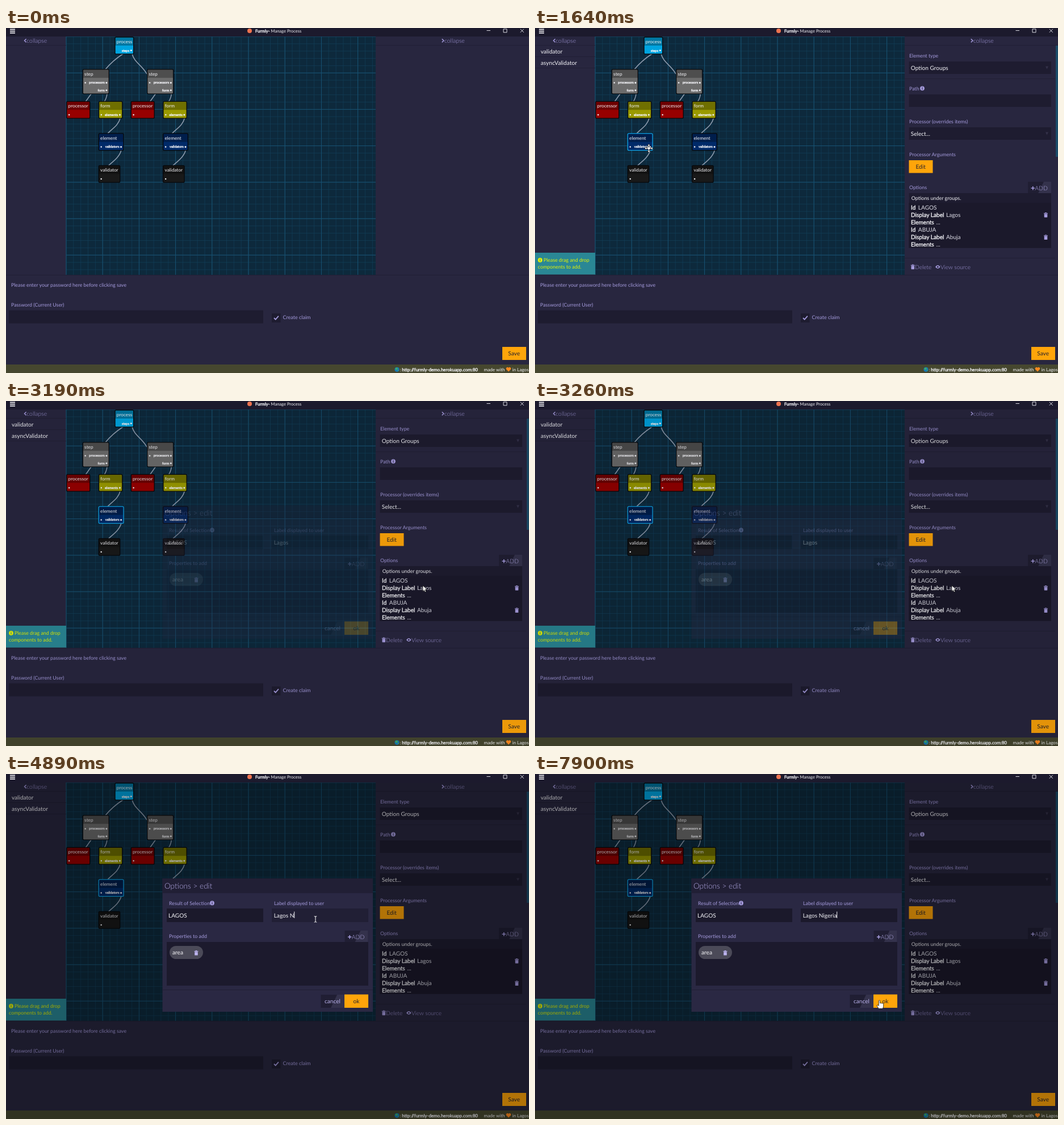
An HTML page for the animation above (8000 ms loop, 921x608 px).

```html
<!DOCTYPE html>
<html lang="en">
<head>
<meta charset="utf-8">
<title>Manage Process</title>
<style>
html, body { margin: 0; width: 100%; height: 100%; overflow: hidden; background: #28263f; }
svg { display: block; }
text { font-family: Lato, "Open Sans", sans-serif; white-space: pre; text-rendering: geometricPrecision; }
.light { font-weight: 300; }
.heavy { stroke: currentColor; stroke-width: .35; }
</style>
</head>
<body>
<svg id="stage" width="921" height="608" viewBox="0 0 921 608"></svg>
<script>
const LILAC = '#a59bdd', WHITE = '#f4f4f8', FIELD = '#1e1c30', ORANGE = '#ffa50a', LINE = '#211f35';
const SMALL = 8.82, MEDIUM = 10.1;

const rect = (x, y, w, h, fill, extra = '') =>
  `<rect x="${x}" y="${y}" width="${w}" height="${h}" fill="${fill}" ${extra}/>`;
const text = (x, y, str, size = SMALL, fill = LILAC, extra = '') =>
  `<text x="${x}" y="${y}" font-size="${size}" fill="${fill}" ${extra}>${str}</text>`;
const path = (d, stroke, width = 1, extra = '') =>
  `<path d="${d}" fill="none" stroke="${stroke}" stroke-width="${width}" ${extra}/>`;
const shape = (d, fill, extra = '') => `<path d="${d}" fill="${fill}" ${extra}/>`;
const dot = (x, y, r, fill) => `<circle cx="${x}" cy="${y}" r="${r}" fill="${fill}"/>`;
const group = (id, body, extra = '') => `<g id="${id}" ${extra}>${body}</g>`;
const light = 'class="light"';
const heavy = `class="heavy" color="${WHITE}"`;

const info = (x, y, fill, mark) => dot(x, y, 3.9, fill) + rect(x - .6, y - 2.4, 1.2, 1.2, mark) + rect(x - .6, y - .5, 1.2, 2.8, mark);
const trash = (x, y, fill = LILAC) =>
  rect(x - 3.5, y - 3.4, 7, 1.2, fill) + rect(x - 1.3, y - 4.4, 2.6, 1.2, fill) +
  rect(x - 2.8, y - 1.8, 5.6, 6, fill, 'rx=".6"');
const button = (x, y, w, h, label, tx) => rect(x, y, w, h, ORANGE) + text(tx, y + h / 2 + 3.7, label, MEDIUM, '#25222c');
const slanted = (x, y, w, h) =>
  rect(x, y, w, h, '#201e33') + shape(`M${x + w} ${y}V${y + h}H${x + w * .42}L${x + w * .68} ${y}Z`, '#34324c');
const addButton = (x, y) => slanted(x, y, 41, 22) +
  path(`M${x + 5.5} ${y + 11.3}h6.5m-3.25 -3.25v6.5`, LILAC, 1.6) + text(x + 12.2, y + 15, 'ADD', 10.4, '#b5ace8', light);

// ---- diagram ----
function node(x, y, w, title, color, rows, id = '') {
  const h = 16.5 + 13.4 * rows.length;
  let out = rect(x, y, w, h, color, 'rx="2"') + rect(x, y, w, 15, 'rgba(0,0,0,.28)') +
    rect(x, y, w, h, 'none', `rx="2" stroke="#06080c" stroke-width="1.3" ${id && `id="${id}"`}`) +
    text(x + 2.8, y + 11, title, 8.25, WHITE);
  rows.forEach(([input, name], i) => {
    const cy = y + 23.6 + i * 13.4;
    if (input) out += dot(x + 4.4, cy, 1.25, WHITE);
    if (name) out += text(x + w - 7.5, cy + 2, name, 5.85, WHITE, `text-anchor="end" ${heavy}`) + dot(x + w - 4.4, cy, 1.5, WHITE);
  });
  return out;
}
const link = d => path(d, '#8f9cae', 1.5);

const tree = (dx, id) => `<g transform="translate(${dx})">` +
  link('M150 116L140 130M178 116Q177 124 173 130M201 159C198 172 186 178 179 186M203 215C200 228 187 236 180 243') +
  node(135.3, 72.8, 46, 'step', '#6c6c6c', [[1, 'processors'], [0, 'form']]) +
  node(106.8, 129.3, 41, 'processor', '#970000', [[1]]) +
  node(163.5, 129.3, 41.3, 'form', '#9a9a00', [[1, 'elements']]) +
  node(163.3, 185.8, 43.7, 'element', '#002a69', [[1, 'validators']], id) +
  node(163.3, 242.3, 37.4, 'validator', '#191919', [[1]]) + '</g>';

function grid() {
  const lines = step => {
    let d = '';
    for (let x = 106; x < 651; x += step) d += `M${x.toFixed(1)} 15V435`;
    for (let y = 15; y < 435; y += step) d += `M106 ${y.toFixed(1)}H651`;
    return d;
  };
  return rect(106, 15, 545, 420, '#0d293c') + path(lines(12.84), '#13405a', .7) + path(lines(64.2), '#185273', 1);
}

const diagram = grid() +
  link('M207 45C196 52 184 62 175 73M222 45C225 60 240 66 248 81') +
  node(192, 16, 32.7, 'process', '#00a4e0', [[0, 'steps']]) + tree(0, 'picked') + tree(113.4);

// ---- frame of the window ----
const titleBar = rect(0, 0, 921, 15, '#1c1a2d') +
  [1.5, 4.7, 7.9].map(y => rect(7, y, 9, 1.7, WHITE)).join('') +
  dot(429, 5, 4, '#ee7350') +
  text(439, 8, 'Furmly-', 7.5, WHITE, heavy) + text(466.5, 8, 'Manage Process', 7.55, WHITE) +
  path('M846.5 4.5h6.5M876 1.8h6v6h-6zM905.8 1.8l6 6m0 -6l-6 6', '#d8d8e0');

const chrome =
  path('M0 30.5H106M651 30.5H921M0 435.5H921', LINE) +
  path('M35.6 19.3l-3 3l3 3M767.8 19.3l3 3l-3 3', LILAC, 1.6) +
  text(36.3, 26, 'collapse', 10.4, LILAC, light) + text(772, 26, 'collapse', 10.4, LILAC, light) +
  text(9, 456, 'Please enter your password here before clicking save') +
  text(9, 491, 'Password (Current User)') + rect(5, 497.5, 448, 23, FIELD) +
  rect(468, 503, 15.5, 16, FIELD) + path('M472 511l2.7 2.7l5.2 -6', LILAC, 1.8) +
  text(487.5, 513, 'Create claim', 9) + button(874, 562, 42, 23, 'Save', 884.3) +
  rect(0, 593, 921, 15, '#46472f') +
  dot(688.5, 601.8, 4.1, '#1678b4') + shape('M686 599l3 -.5l1 2l-2 2l-2.5 -1zM690 602l2 1l-2 2z', '#3fae62') +
  text(693.6, 604.6, ':', 8, WHITE) + text(697.3, 604.6, 'http://furmly-demo.herokuapp.com:80', 7.95, WHITE, heavy) +
  text(841.5, 604.6, 'made with', 8.1, WHITE) +
  shape('M885 605.6l-4 -4.2a2.3 2.3 0 0 1 4 -2.4a2.3 2.3 0 0 1 4 2.4z', '#ff8a1f') +
  text(891.5, 604.6, 'in Lagos', 8.1, WHITE);

// ---- side panels shown once a node is picked ----
const palette = text(10, 44.5, 'validator', MEDIUM, WHITE) + text(10, 64.5, 'asyncValidator', MEDIUM, WHITE) +
  path('M0 50.5H106M0 70.5H106', LINE) + rect(0, 396, 106, 38.5, '#2a8795') +
  info(9, 409, '#e6f200', '#2a8795') +
  text(15, 412.3, 'Please drag and drop', SMALL, '#e6f200') + text(5, 424, 'components to add.', SMALL, '#e6f200');

const select = (y, value) => rect(658.5, y, 250.5, 22, FIELD) + text(661.8, y + 14.6, value, MEDIUM, WHITE) +
  shape(`M899 ${y + 8.5}h5l-2.5 5z`, '#343149');
const option = (y, id, label) =>
  text(662, y, 'Id', MEDIUM, WHITE, heavy) + text(674.8, y, id, MEDIUM, '#dcdce6') +
  text(662, y + 13, 'Display Label', MEDIUM, WHITE, heavy) + text(724, y + 13, label, MEDIUM, '#dcdce6') +
  text(662, y + 26, 'Elements', MEDIUM, WHITE, heavy) + text(706.5, y + 26, '...', MEDIUM, '#dcdce6') + trash(899.5, y + 9.5);

const details = rect(917, 31, 4, 196, '#1b4b68') +
  text(659, 52, 'Element type') + select(59, 'Option Groups') + path('M651 89.5H916M651 405.5H916', LINE) +
  text(659, 109.5, 'Path') + info(682, 106.3, LILAC, '#28263f') + rect(658.5, 117, 250.5, 22, FIELD) +
  text(659, 168, 'Processor (overrides items)') + select(175, 'Select...') +
  text(659, 226, 'Processor Arguments') + button(658.5, 233, 42, 22.5, 'Edit', 670.5) +
  text(659, 284, 'Options') + addButton(868, 271) +
  rect(658.5, 291, 250.5, 96.5, FIELD) + rect(658.5, 308, 250.5, 79.5, '#1b192b') +
  text(662.8, 303, 'Options under groups.', 8.95, WHITE) +
  option(320, 'LAGOS', 'Lagos') + option(359.3, 'ABUJA', 'Abuja') +
  trash(665.3, 421) + text(669, 424.5, 'Delete', 10.2, LILAC, light) +
  shape('M705 421q4.3 -6 8.6 0q-4.3 6 -8.6 0z', LILAC) + dot(709.3, 421, 1.6, '#28263f') +
  text(714, 424.5, 'View source', 10.1, LILAC, light);

// ---- dialog ----
const dialog = rect(275.5, 184, 370.5, 235, '#2a2843') + rect(275.5, 184, 370.5, 26, '#211f35') +
  text(279, 202, 'Options &gt; edit', 13.6, '#b5ace8', light) +
  text(287, 230.5, 'Result of Selection') + info(363, 227.4, LILAC, '#2a2843') + text(472, 230.5, 'Label displayed to user') +
  rect(283, 237, 170, 24, '#1b192b') + text(286, 252.7, 'LAGOS', MEDIUM, WHITE) +
  rect(468, 237, 170, 24, '#1b192b', 'id="field"') +
  text(471.7, 252.5, 'Lagos', MEDIUM, WHITE, 'id="label"') + rect(0, 242.5, 1, 11.5, WHITE, 'id="caret"') +
  text(287, 289, 'Properties to add') + addButton(596.5, 276) + rect(283, 296, 355, 77, '#1c1a2d') +
  rect(288, 303, 59, 23, '#4b4a58', 'rx="11.5"') + text(293, 318.3, 'area', 10.2, WHITE) + trash(335, 315.3, '#bcb3ee') +
  path('M275.5 380.5H646', LINE) + slanted(554.5, 389, 42, 23) + text(561, 404.2, 'cancel', MEDIUM, '#bcb3ee') +
  button(596, 388.5, 42, 23.5, 'ok', 611.5);

// ---- pointers, each drawn around its hot spot ----
const outlined = 'stroke="#111" stroke-width=".8" stroke-linejoin="round"';
const arm = 'M0 -7.5l2.8 3.2h-1.9v3.4h-1.8v-3.4h-1.9z';
const pointers = {
  arrow: shape('M0 0V10.4L2.4 8.2L4 11.8L5.8 11L4.2 7.5H7.3Z', '#fff', outlined),
  hand: shape('M-1.2 .6q1.2 -1.6 2.4 0V5q1 -.9 2 .1q1 -.8 2 .2q1.3 -.6 2 .6V10q0 2 -1.5 4.4H-1.5Q-2.8 11.6 -4.4 9.4Q-4.4 7.5 -2.4 8.4L-1.2 9.4Z', '#fff', outlined),
  ibeam: path('M-2.3 -5.2q2 0 2.3 1q.3 -1 2.3 -1M0 -4.5V4.5M-2.3 5.2q2 0 2.3 -1q.3 1 2.3 1', '#f0f0f0', 1.1),
  move: [0, 90, 180, 270].map(a => shape(arm, '#fff', `${outlined} transform="rotate(${a})"`)).join('') +
    rect(-.9, -2.5, 1.8, 5, '#fff') + rect(-2.5, -.9, 5, 1.8, '#fff')
};

const stage = document.getElementById('stage');
stage.innerHTML = rect(0, 0, 921, 608, '#28263f') + diagram + chrome +
  group('panels', palette + details) + rect(0, 15, 921, 593, '#000', 'id="shade"') + titleBar + group('dialog', dialog) +
  group('pointer', `<circle id="press" r="9.5" fill="#d6d02c" opacity=".7"/>` +
    Object.entries(pointers).map(([k, body]) => group(k, body)).join(''));

// ---- timeline ----
const LOOP = 8000, PICK = 1640, OPEN = 3040;
const keys = [4490, 4890, 5040, 5270, 5350, 5500, 5680, 6590];
const track = [
  [300, 752, 596, 'arrow'], [375, 630, 480, 'move'], [450, 518, 374, 'move'], [630, 518, 374, 'move'],
  [770, 328, 227, 'move'], [930, 328, 227, 'move'], [1400, 200.5, 212, 'move'], [1950, 200.5, 212, 'move'],
  [2100, 390, 198, 'move'], [2180, 562, 230, 'move'], [2340, 562, 230, 'move'], [2470, 690, 312, 'hand'],
  [2560, 738.5, 345, 'hand'], [2640, 738.5, 345, 'hand'], [2870, 734, 325, 'hand'], [OPEN, 734, 325, 'arrow'],
  [3400, 734, 325, 'arrow'], [3620, 600, 262, 'ibeam'], [3700, 557, 251, 'ibeam'], [3810, 557, 251, 'ibeam'],
  [4110, 545, 256, 'ibeam'], [7140, 545, 256, 'ibeam'], [7210, 530, 266, 'arrow'], [7360, 488, 315, 'arrow'],
  [7500, 482, 350, 'arrow'], [7640, 525, 385, 'arrow'], [7760, 598, 396, 'hand'], [7900, 606.5, 399, 'hand']
];
const $ = id => document.getElementById(id);
const set = (id, name, value) => $(id).setAttribute(name, value);
const show = (id, on) => set(id, 'visibility', on ? 'visible' : 'hidden');
const clamp = v => Math.min(1, Math.max(0, v));

function drawPointer(t) {
  $('pointer').style.display = t < 300 ? 'none' : '';
  const i = Math.max(0, track.findLastIndex(k => k[0] <= t));
  const a = track[i], b = track[i + 1] || a;
  const p = clamp((t - a[0]) / (b[0] - a[0] || 1));
  set('pointer', 'transform', `translate(${a[1] + (b[1] - a[1]) * p} ${a[2] + (b[2] - a[2]) * p})`);
  for (const kind in pointers) show(kind, kind === a[3]);
  show('press', t >= 1550 && t < PICK);
}

function draw(t) {
  const picked = t >= PICK, fade = clamp((t - OPEN) / 600);
  show('panels', picked);
  set('picked', 'stroke', picked ? '#0fa5e8' : '#06080c');
  set('shade', 'opacity', fade * .3);
  set('dialog', 'opacity', fade);

  const typed = keys.filter(k => k <= t);
  $('label').textContent = 'Lagos' + ' Nigeria'.slice(0, typed.length);
  const since = t - (typed.at(-1) ?? 4000);
  $('caret').style.display = since >= 0 && since % 1000 < 500 ? '' : 'none';
  set('caret', 'x', 471.5 + $('label').getComputedTextLength());
  set('field', 'fill', t > 3620 && t < 7210 ? '#211f35' : '#1b192b');
  drawPointer(t);
}

const start = performance.now();
(function tick() {
  draw((performance.now() - start) % LOOP);
  requestAnimationFrame(tick);
})();
</script>
</body>
</html>
```
